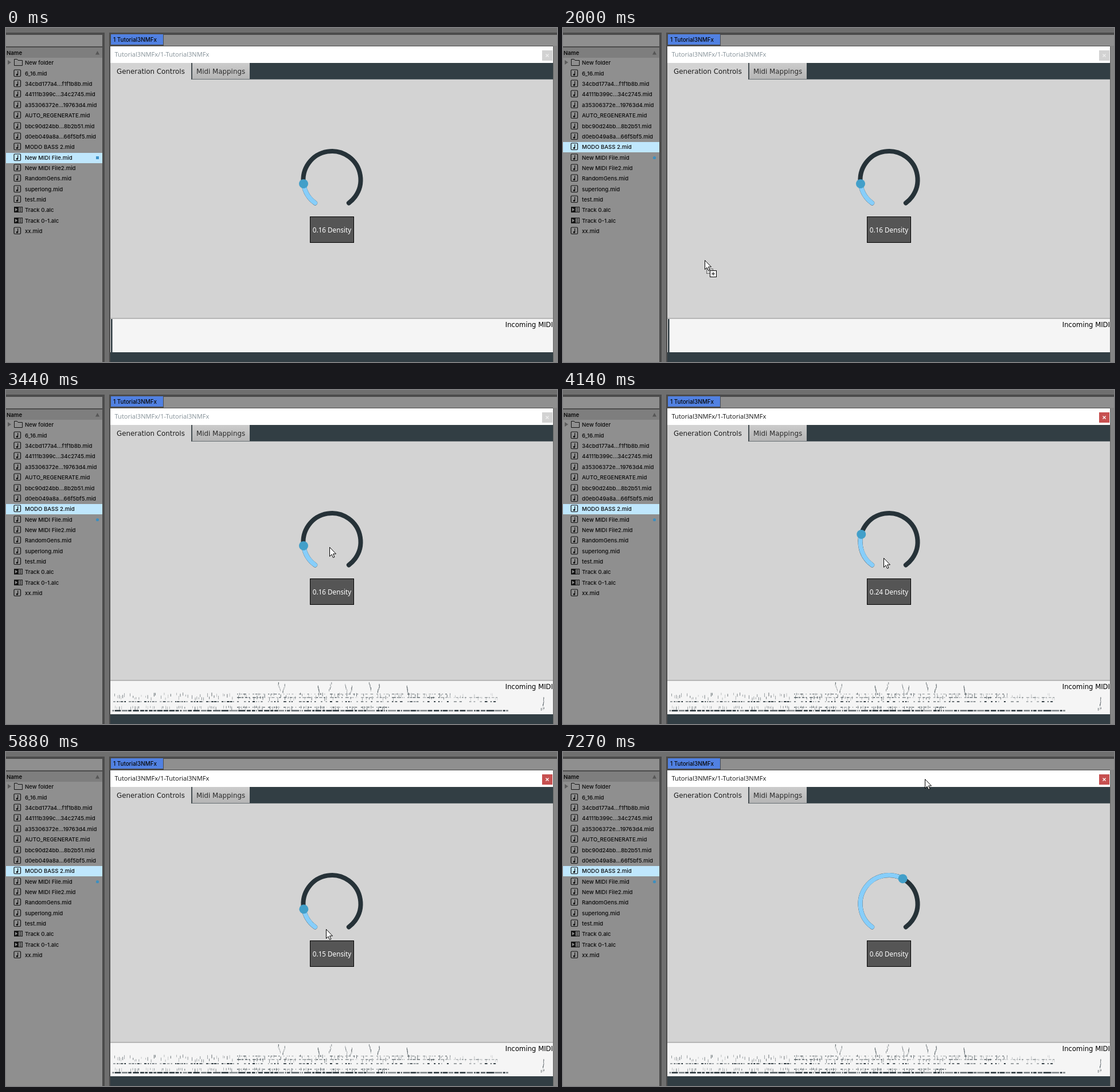
Write an HTML page with a canvas that moves like this. It is 961 px wide and 583 px high and loops after 7.34 s.

```html
<!DOCTYPE html>
<html lang="en">
<head>
<meta charset="utf-8">
<title>Density control</title>
<style>
html, body { margin: 0; width: 100%; height: 100%; overflow: hidden; background: #8f8f8f; }
canvas { display: block; }
</style>
</head>
<body>
<canvas id="stage" width="961" height="583"></canvas>
<script>
const LOOP = 7340;
const ENTER = 130, SELECT = 1170, DRAG = 1440, DROP = 2420, LOADED = 2670, ACTIVE = 3930, RELEASE = 6420;
const g = document.getElementById('stage').getContext('2d');
const UI = 'Inter, sans-serif', LABEL = '"DejaVu Sans", sans-serif';
const INK = '#151515', TRACK = '#263238', FRAME = '#323e44', LIST = '#8f8f8f', EDGE = '#4b4b4b';

const files = ['New folder', '6_16.mid', '34cbd177a4...f1f1b8b.mid', '44111b399c...34c2745.mid',
  'a35306372e...19763d4.mid', 'AUTO_REGENERATE.mid', 'bbc90d24bb...8b2b51.mid',
  'd0eb049a8a...66f5bf5.mid', 'MODO BASS 2.mid', 'New MIDI File.mid', 'New MIDI File2.mid',
  'RandomGens.mid', 'superlong.mid', 'test.mid', 'Track 0.alc', 'Track 0-1.alc', 'xx.mid'];

// time, x, y of the pointer while it moves freely
const approach = [[ENTER, 907, 568], [830, 58, 215], [970, 67, 204], [DRAG, 67, 204], [2000, 247, 404],
  [2140, 295, 478], [2480, 342, 525], [3160, 342, 525], [3440, 564, 274], [3860, 558, 307]];
const leave = [[RELEASE, 574, 227], [6930, 631, 41], [7200, 631, 39], [7270, 631, 47]];

// time, knob value at each turning point
const turns = [[3900, .16], [4980, .84], [5580, .15], [5880, .15], [RELEASE, .6]];

const linear = p => p;
const swing = p => (1 - Math.cos(Math.PI * p)) / 2;

function at(keys, t, i, ease = linear) {
  const k = keys.findIndex(key => key[0] > t);
  if (k < 0) return keys[keys.length - 1][i];
  if (k === 0) return keys[0][i];
  const a = keys[k - 1], b = keys[k];
  return a[i] + (b[i] - a[i]) * ease((t - a[0]) / (b[0] - a[0]));
}

// While the knob is held, the pointer height sets its value
function pointerAt(t, value) {
  if (t >= ACTIVE && t < RELEASE) {
    const u = (value - .15) / .66;
    return [558 + 35 * u * u, 309 - 120 * u];
  }
  const keys = t < ACTIVE ? approach : leave;
  return [at(keys, t, 1), at(keys, t, 2)];
}

function rect(x, y, w, h, color, c = g) {
  c.fillStyle = color;
  c.fillRect(x, y, w, h);
}

function box(x, y, w, h, fill, line) {
  if (fill) rect(x, y, w, h, fill);
  g.strokeStyle = line;
  g.lineWidth = 1;
  g.strokeRect(x + .5, y + .5, w - 1, h - 1);
}

function text(s, x, y, font, color, align = 'left') {
  g.font = font;
  g.fillStyle = color;
  g.textAlign = align;
  g.fillText(s, x, y);
}

function shape(points, fill, line) {
  g.beginPath();
  points.forEach(([x, y]) => g.lineTo(x, y));
  g.closePath();
  if (fill) { g.fillStyle = fill; g.fill(); }
  if (line) { g.strokeStyle = line; g.lineWidth = 1; g.stroke(); }
}

function disc(x, y, r, color) {
  g.fillStyle = color;
  g.beginPath();
  g.arc(x, y, r, 0, 2 * Math.PI);
  g.fill();
}

function noteIcon(y) {
  g.strokeStyle = INK;
  g.lineWidth = 1.2;
  g.beginPath();
  g.roundRect(14, y - 6, 11.5, 11.5, 1.5);
  g.stroke();
  rect(20, y - 4, 1.2, 7, INK);
  disc(19.4, y + 2.5, 1.7, INK);
}

function clipIcon(y) {
  rect(14, y - 5, 7, 10, INK);
  shape([[16, y - 3], [20, y], [16, y + 3]], LIST);
  box(21, y - 5, 8, 10, null, INK);
  for (let row = -3; row < 4; row += 2.5) rect(23, y + row, 4, 1, INK);
}

function folderIcon(y) {
  shape([[14.5, y - 5.5], [19.5, y - 5.5], [21, y - 3.5], [28.5, y - 3.5], [28.5, y + 5.5], [14.5, y + 5.5]],
    null, INK);
  shape([[3, y - 4], [9, y], [3, y + 4]], '#5c5c5c');
}

function browser(t) {
  rect(0, 0, 961, 583, '#6f6f6f');
  rect(0, 8, 172, 575, EDGE);
  rect(0, 12, 168, 20, LIST);
  rect(0, 34, 168, 18, '#7e7e7e');
  rect(0, 52, 168, 531, LIST);
  text('Name', 1, 47, '600 9.6px ' + UI, '#0a0a0a');
  shape([[156, 46.5], [159.5, 40], [163, 46.5]], '#565656');
  const chosen = t < SELECT ? 9 : 8;
  files.forEach((name, i) => {
    const y = Math.round(60.4 + i * 18.36);
    if (i === chosen) rect(0, y - 8, 168, 18, '#bfe7fd');
    if (i === 0) folderIcon(y);
    else if (name.endsWith('.alc')) clipIcon(y);
    else noteIcon(y);
    text(name, 33, y + 3.5, '500 9.6px ' + UI, '#0a0a0a');
  });
  if (t < SELECT) rect(157, 224, 5, 5, '#3f93c9');
  else disc(159.5, 226.5, 2.6, '#3d8fc0');
}

function seeded(seed) {
  return () => (seed = (seed * 16807) % 2147483647) / 2147483647;
}

// Miniature piano roll, drawn once: repeated phrases above a steady bass line
const roll = document.createElement('canvas');
roll.width = 961;
roll.height = 583;
(function drawRoll() {
  const c = roll.getContext('2d'), rnd = seeded(4711);
  const tone = strength => `rgba(38,50,56,${strength * (.3 + .7 * rnd())})`;
  const dashes = (x0, x1, y, h, len, gap, strength) => {
    for (let x = x0; x < x1;) {
      const w = 1 + rnd() * len;
      rect(x, y, Math.min(w, x1 - x), h, tone(strength), c);
      x += w + 1 + rnd() * gap;
    }
  };
  const ticks = (x0, x1, y, spread, gap, strength) => {
    for (let x = x0; x < x1; x += 2 + rnd() * gap)
      rect(x, y + rnd() * spread, 1, 3 + rnd() * 4, tone(strength), c);
  };
  const streak = (x, y, lean) => {
    for (let i = 0; i < 5; i++)
      rect(x + lean * i + rnd() * 2, y + 3 * i, 1, 4, tone(.8), c);
  };

  dashes(186, 876, 558.5, 2.5, 14, 1.5, 1.6);
  for (let x = 187; x < 850; x += 27) {
    const end = x + 22, late = x > 400, tail = x > 770;
    dashes(x, end, 543, 2, 4, late ? 8 : 1.5, 1.1);
    ticks(x + 2, end, 528, 9, late ? 5 : 4, tail ? .3 : .7);
    if (late) dashes(x, end, 536, 1.5, 6, 2, tail ? .5 : .8);
    if (late && !tail) dashes(x, end, 530, 1.5, 4, 5, .7);
    if (x < 660) ticks(x + 3, x + 18, 551, 2, 3, .7);
    if (late && x < 660) dashes(x, end, 553, 1.5, 3, 4, .9);
  }
  [473, 485, 543, 566, 590, 602, 632, 650, 697].forEach((x, i) => streak(x, 510 + i % 3 * 3, i % 2 ? -.8 : .8));
  streak(936, 536, -.2);
  ticks(933, 938, 553, 3, 1, .8);
})();

function knob(value) {
  const cx = 568.5, cy = 265, r = 50;
  const angle = v => (.7 + 1.6 * v) * Math.PI;
  const sweep = (v, color, width) => {
    g.strokeStyle = color;
    g.lineWidth = width;
    g.beginPath();
    g.arc(cx, cy, r, angle(0), angle(v));
    g.stroke();
  };
  g.lineCap = 'round';
  sweep(1, TRACK, 8);
  sweep(value, '#87cefa', 7.8);
  g.lineCap = 'butt';
  disc(cx + r * Math.cos(angle(value)), cy + r * Math.sin(angle(value)), 8, '#429fc9');
  box(530, 329, 77, 46, '#555555', '#000');
  text(value.toFixed(2) + ' Density', 568.5, 357, '11.7px "Noto Sans", sans-serif', '#fff', 'center');
}

function titleBar(active) {
  rect(182, 32, 772, 29, '#fff');
  text('Tutorial3NMFx/1-Tutorial3NMFx', 189.5, 50, '11.1px "Open Sans", sans-serif', active ? '#111' : '#849097');
  rect(935, 39, 18, 18, active ? '#c75050' : '#d2d2d2');
  g.strokeStyle = active ? '#fff' : '#eee';
  g.lineWidth = 1.3;
  g.beginPath();
  g.moveTo(941.5, 45.5); g.lineTo(946.5, 50.5);
  g.moveTo(946.5, 45.5); g.lineTo(941.5, 50.5);
  g.stroke();
}

function plugin(t) {
  rect(180, 8, 781, 575, EDGE);
  rect(183, 11, 91, 18, '#5181e2');
  rect(275, 12, 686, 19, LIST);
  text('1 Tutorial3NMFx', 187, 23.5, '500 9.9px ' + UI, '#080808');
  rect(954, 31, 7, 552, '#858585');
  rect(954, 32, 1, 551, '#666');
  titleBar(t >= ACTIVE);

  rect(182, 61, 772, 522, FRAME);
  rect(182, 90, 772, 417, '#d3d3d3');
  rect(182, 61, 141, 29, '#d3d3d3');
  const shade = g.createLinearGradient(0, 61, 0, 89);
  shade.addColorStop(0, '#cccccc');
  shade.addColorStop(1, '#b5b5b5');
  rect(325, 61, 100, 28, shade);
  rect(323, 61, 1.5, 29, '#4c5356');
  rect(324, 89, 630, 1, '#687074');
  text('Generation Controls', 193, 80.3, '11.85px ' + LABEL, '#1c1c1c');
  text('Midi Mappings', 332, 80.3, '11.85px ' + LABEL, '#2b2b2b');

  rect(182, 507, 772, 59, '#f5f5f5');
  rect(182, 506.5, 772, 1, '#8c8c8c');
  if (t < LOADED) rect(183, 508, 2.5, 58, TRACK);
  else g.drawImage(roll, 0, 0);
  text('Incoming MIDI', 954, 522, '11.65px ' + LABEL, '#000', 'right');
}

function pointer(x, y, dragging) {
  g.save();
  g.translate(Math.round(x), Math.round(y));
  if (dragging) {
    g.setLineDash([1, 1]);
    box(3, 15, 12, 9, null, '#000');
    g.setLineDash([]);
    box(9, 18, 12, 12, '#fff', '#000');
    rect(12, 23.5, 6, 1, '#000');
    rect(14.5, 21, 1, 6, '#000');
  }
  shape([[.5, .5], [.5, 16.5], [4, 13], [6.5, 18.5], [9, 17.5], [6.5, 12], [11.5, 12]], '#fff', '#000');
  g.restore();
}

function draw(t) {
  const value = at(turns, t, 1, swing);
  browser(t);
  plugin(t);
  knob(value);
  if (t < ENTER) return;
  const [x, y] = pointerAt(t, value);
  pointer(x, y, t > DRAG && t < DROP && x > 170);
}

const origin = performance.now();
function tick() {
  draw((performance.now() - origin) % LOOP);
  requestAnimationFrame(tick);
}
tick();
</script>
</body>
</html>
```
